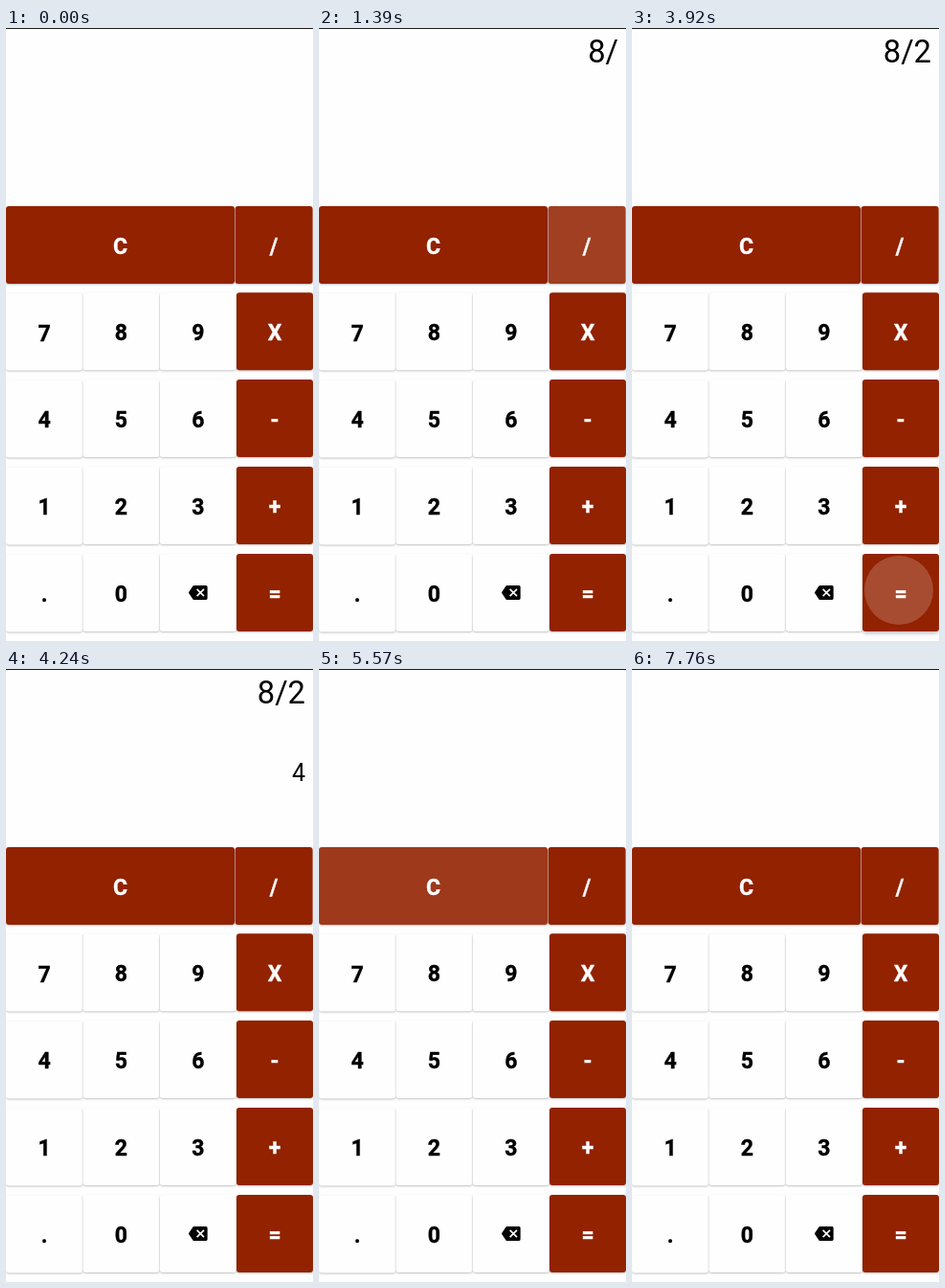
Animation of 321 by 640 pixels, one loop 8 s. Source, as an HTML page:

```html
<!DOCTYPE html>
<html lang="en">
<head>
<meta charset="utf-8">
<title>Calculator</title>
<style>
  html, body { margin: 0; width: 100%; height: 100%; overflow: hidden; background: #fefefe; }
  body { font-family: Roboto, sans-serif; }
  #stage { position: absolute; left: 0; top: 0; width: 321px; height: 640px; overflow: hidden; color: #000; }
  #edge { position: absolute; width: 100%; height: 1px; background: #1c1c1c; }
  .readout { position: absolute; line-height: 40px; white-space: pre; }
  #entry { right: 8px; top: 5px; font-size: 32.7px; }
  #result { right: 8px; top: 89px; font-size: 25px; }
  .key { position: absolute; left: 0; top: 0; border-radius: 3px; background: #fefefe; }
  .key.dark { background: #922200; color: #fff; }
  .clip { position: absolute; inset: 0; border-radius: 3px; overflow: hidden; }
  .ripple { position: absolute; border-radius: 50%; background: #fff; }
  .label { position: absolute; inset: 0; text-align: center; font-weight: 700; font-size: 23px; line-height: 85px;
    -webkit-text-stroke: 0.4px currentColor; }
  .label svg { position: absolute; left: 30px; top: 33px; }
</style>
</head>
<body>
<div id="stage">
  <div id="edge"></div>
  <div id="entry" class="readout"></div>
  <div id="result" class="readout"></div>
</div>
<script>
const LOOP = 8000, RIPPLE_IN = 225, RIPPLE_OUT = 150, RIPPLE_ALPHA = 0.215;
const KEY_HEIGHT = 81;
const stage = document.getElementById('stage');
const entry = document.getElementById('entry');
const result = document.getElementById('result');
const keys = {};

const backspace = `<svg width="20" height="15" viewBox="0 0 24 18">
  <path d="M7 0H22a2 2 0 0 1 2 2V16a2 2 0 0 1-2 2H7Q6 18 5.4 17L0 9 5.4 1Q6 0 7 0Z"/>
  <path d="M10.6 4.6l8.8 8.8m0-8.8l-8.8 8.8" stroke="#fff" stroke-width="2"/></svg>`;

function addKey(name, x, y, w, dark) {
  const el = document.createElement('div');
  el.className = dark ? 'key dark' : 'key';
  el.style.cssText = `width:${w}px;height:${KEY_HEIGHT}px;transform:translate(${x}px,${y}px)`;
  el.innerHTML = `<div class="clip"><div class="ripple"></div></div>
    <div class="label">${name === 'back' ? backspace : name}</div>`;
  stage.append(el);
  keys[name] = { el, ripple: el.querySelector('.ripple'), x, y, w, h: KEY_HEIGHT };
}

addKey('C', 0, 186, 239, true);
addKey('/', 239.6, 186, 81, true);
['789X', '456-', '123+', ['.', '0', 'back', '=']].forEach((row, r) => {
  const y = [276.2, 367, 458, 549][r];
  [...row].forEach((name, c) =>
    addKey(name, [0, 80.4, 160.8, 241][c], c ? y : y + 0.4, 80, c === 3));
});

// Screen updates arrive every `step` ms from `at`; rise and fall start the key's lift.
const presses = [
  { key: '8', at: 420, step: 70, rise: 320, fall: 490 },
  { key: '/', at: 1040, step: 70, rise: 1150, fall: 1280, start: 1105, touch: [296, 226] },
  { key: '2', at: 2230, step: 83, rise: 2130, fall: 2290 },
  { key: '=', at: 3920, step: 80, rise: 3860, fall: 4000, start: 3853, touch: [277.7, 586] },
  { key: 'C', at: 5220, step: 70, rise: 5280, fall: 5400, start: 5269, touch: [148.7, 236] }
];

const readouts = [
  [0, '', ''], [420, '8', ''], [1250, '8/', ''], [2230, '8/2', ''],
  [4000, '8/2', '4'], [5360, '', '']
];

const clamp = v => Math.max(0, Math.min(1, v));
const mix = (a, b, p) => a + (b - a) * p;

// Cubic bezier (0.4, 0, 0.2, 1)
function ease(x) {
  let lo = 0, hi = 1;
  for (let i = 0; i < 24; i++) {
    const s = (lo + hi) / 2, r = 1 - s;
    if (1.2 * r * r * s + 0.6 * r * s * s + s ** 3 < x) lo = s; else hi = s;
  }
  return 3 * (1 - lo) * lo * lo + lo ** 3;
}

function drawLift(el, lift) {
  el.style.zIndex = lift > 0 ? 1 : 0;
  el.style.boxShadow =
    `0 ${mix(1, 4, lift)}px ${mix(2, 5, lift)}px ${-lift}px rgba(0,0,0,0.24)`;
}

function drawRipple(key, press, t) {
  const age = t - press.start;
  const p = ease(clamp(age / RIPPLE_IN));
  const radius = mix(0.3 * Math.max(key.w, key.h), Math.hypot(key.w, key.h) / 2, p);
  const x = mix(press.touch[0] - key.x, key.w / 2, p) - radius;
  const y = mix(press.touch[1] - key.y, key.h / 2, p) - radius;
  const alpha = RIPPLE_ALPHA * clamp(age / 75) * (1 - clamp((age - RIPPLE_IN) / RIPPLE_OUT));
  Object.assign(key.ripple.style, {
    left: x + 'px', top: y + 'px', width: 2 * radius + 'px', height: 2 * radius + 'px', opacity: alpha
  });
}

function draw(t) {
  const [, top, bottom] = readouts.filter(r => r[0] <= t).pop();
  entry.textContent = top;
  result.textContent = bottom;
  for (const press of presses) {
    const key = keys[press.key];
    const shown = t < press.at ? 0 : press.at + Math.floor((t - press.at) / press.step) * press.step;
    drawLift(key.el, clamp((shown - press.rise) / 100) - clamp((shown - press.fall) / 100));
    if (press.touch) drawRipple(key, press, shown);
  }
}

Object.values(keys).forEach(key => drawLift(key.el, 0));
const begin = performance.now();
function tick() {
  draw((performance.now() - begin) % LOOP);
  requestAnimationFrame(tick);
}
tick();
</script>
</body>
</html>
```
